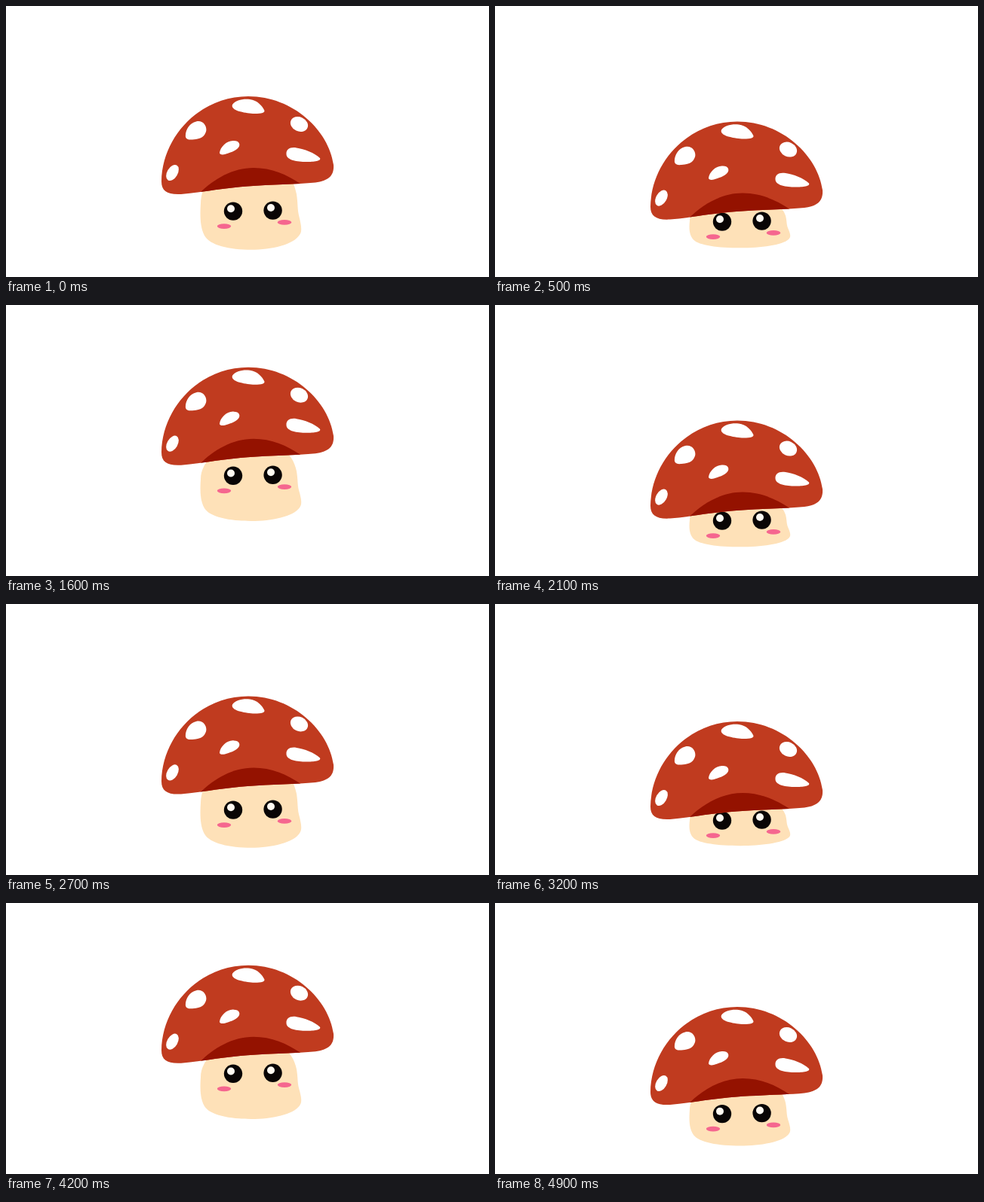
Animation, 640 px wide and 360 px high, one loop 5 s. Source, as an HTML page:

```html
<!DOCTYPE html>
<html lang="en">
<head>
<meta charset="utf-8">
<title>Hopping mushroom</title>
<style>
  html, body { margin: 0; width: 100%; height: 100%; overflow: hidden; background: #fff; }
  svg { display: block; width: 100vw; height: 100vh; }
</style>
</head>
<body>
<svg viewBox="0 0 640 360">
  <defs>
    <path id="capShape" d="M206 233C207 172 258 120 321 120C381 120 428 166 434 211C435 225 428 232 410 234.5C385 237 350 237 320 239.5C285 242 258 248 232 250C214 251 206 246 206 233Z"/>
    <clipPath id="capClip"><use href="#capShape"/></clipPath>
  </defs>

  <path id="body" fill="#fee1b8" d="M258 262C258 235 285 205 325 205C360 205 380 222 385 250C387 264 386 268 388 278C391 290 393 299 389 304C381 317 352 323.8 325 323.8C296 323.8 270 318 263 305C257 294 257 277 258 262Z"/>

  <g id="face">
    <g fill="#f5668f">
      <ellipse cx="289" cy="292.6" rx="9.2" ry="3.4"/>
      <ellipse cx="369" cy="287.4" rx="9.2" ry="3.4"/>
    </g>
    <g fill="#090505">
      <circle cx="301" cy="272.6" r="12.2"/>
      <circle cx="353.6" cy="271.6" r="12.2"/>
    </g>
    <g fill="#fffaf2">
      <circle cx="298" cy="269.3" r="5"/>
      <circle cx="351" cy="268" r="5"/>
    </g>
  </g>

  <g id="cap">
    <use href="#capShape" fill="#c03b1f"/>
    <path clip-path="url(#capClip)" fill="#941200" d="M256 249C275 230 300 215 328 215C352 215 372 224 390 236L390 252H256Z"/>
    <g fill="#fff">
      <path d="M300 131C304 125 314 123 323 124C333 125 340 133 342.5 139C343 143 335 143 327 143C316 142 297 139 300 131Z"/>
      <path d="M238 174C237 166 243 155 252 153.5C261 151 267 160 265 167C262 176 254 177 247 177.5C242 178 239 177 238 174Z"/>
      <path d="M283 195C284 187 293 178 302 179C309 179 311 184 308 188C304 193 296 195 290 197C286 198 283 197 283 195Z"/>
      <path d="M371.5 197C371 190 377 187 385 188.5C395 190 409 195 416 202C418 206 408 207 398 207C386 207 372 205 371.5 197Z"/>
      <ellipse cx="388.5" cy="157" rx="12" ry="9.5" transform="rotate(25 388.5 157)"/>
      <ellipse cx="220.5" cy="221.5" rx="7" ry="11.5" transform="rotate(30 220.5 221.5)"/>
    </g>
  </g>
</svg>
<script>
  const LOOP = 5000, STEP = 100;
  const HOP = 2600, CROUCH = 600, LEAP = 700;
  const FLOOR = 323.8;
  const [body, face, cap] = ['body', 'face', 'cap'].map(id => document.getElementById(id));

  const ease = x => (1 - Math.cos(Math.PI * x)) / 2;

  // Each hop runs rest, crouch, peak and then the same way back.
  function pose(t, rest, crouch, peak) {
    const u = Math.min(t % HOP, HOP - t % HOP);
    return u < CROUCH
      ? rest + (crouch - rest) * ease(u / CROUCH)
      : crouch + (peak - crouch) * ease((u - CROUCH) / LEAP);
  }

  function draw(t) {
    const bottom = pose(t, FLOOR, 321.2, 265.2);
    const stretch = pose(t, 1, 0.55, 1.12);
    body.setAttribute('transform', `translate(0 ${bottom}) scale(1 ${stretch}) translate(0 ${-FLOOR})`);
    face.setAttribute('transform', `translate(0 ${pose(t, 0, 15, -84.5)})`);
    cap.setAttribute('transform', `translate(0 ${pose(t, 0, 36, -84)})`);
  }

  function tick() {
    const t = performance.now() % LOOP;
    draw(Math.floor(t / STEP) * STEP);
    requestAnimationFrame(tick);
  }
  tick();
</script>
</body>
</html>
```
